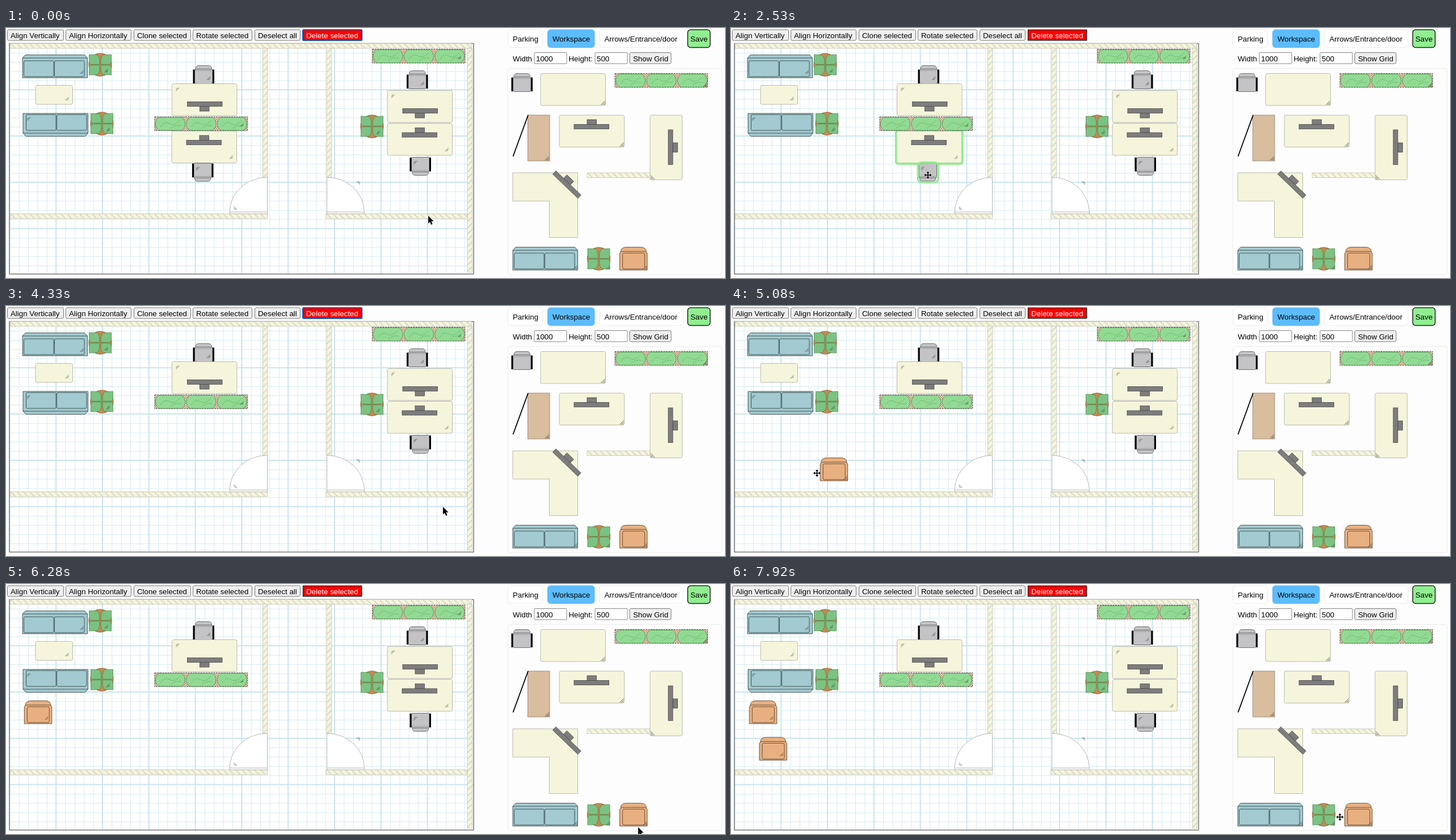
Write an HTML page that moves like this. It is 1267 px wide and 442 px high and loops after 8 s.

```html
<!DOCTYPE html>
<html lang="en">
<head>
<meta charset="utf-8">
<title>Floor plan editor</title>
<style>
html, body { margin: 0; width: 100%; height: 100%; overflow: hidden; background: #fdfdfd; }
svg { display: block; width: 1267px; height: 442px; }
text { font: 13.3px "Liberation Sans", Arial, sans-serif; fill: #000; }
.btn { fill: #efefef; stroke: #767676; }
.tab { fill: #fff; stroke: #ececec; }
.field { fill: #fff; stroke: #858585; }
.desk { fill: #f5f5dc; stroke: #b9b9ae; }
.screen { fill: #7d7d7d; stroke: #4a4a4a; stroke-width: .8; }
.sofa { fill: #a2cad0; stroke: #26383c; stroke-width: .8; }
.seat { fill: #e8b081; stroke: #4f3623; stroke-width: .8; }
.leaf { fill: #7cc282; stroke: #3f7f47; stroke-width: .7; }
.bush { fill: #92da94; stroke: #4b9452; stroke-width: .8; }
.vein { fill: none; stroke: #6cb972; stroke-width: .9; }
.chair { fill: #c3c3c6; stroke: #555; stroke-width: .8; }
.door { fill: #fff; stroke: #b5b5b5; }
.wall { stroke: #c4c4b6; stroke-width: .8; }
.pick { fill: none; stroke: #90ee90; stroke-width: 3.4; }
.grip { fill: none; stroke: #333; stroke-width: .8; }
.mark { fill: #000; opacity: .22; }
.cursor { fill: #000; stroke: #fff; stroke-linejoin: round; paint-order: stroke; }
</style>
</head>
<body>
<svg viewBox="0 0 1267 442">
  <defs>
    <pattern id="minor" x="6.4" y="27.4" width="16.36" height="16.36" patternUnits="userSpaceOnUse">
      <path d="M0 .4H16.4M.4 0V16.4" stroke="#cce6f0" stroke-width=".9"/>
    </pattern>
    <pattern id="major" x="5.4" y="26.4" width="81.8" height="81.8" patternUnits="userSpaceOnUse">
      <path d="M0 .8H82M.8 0V82" stroke="#c6e3ee" stroke-width="1.6"/>
    </pattern>
    <pattern id="hatch" width="11" height="8.5" patternUnits="userSpaceOnUse">
      <rect width="11" height="8.5" fill="#f5f5dc"/>
      <path d="M1 0L9.5 8.5" stroke="#cdcdc1" stroke-width="1.4"/>
    </pattern>
    <pattern id="soil" width="4" height="4" patternUnits="userSpaceOnUse">
      <rect width="4" height="4" fill="#e6d3bd"/>
      <path d="M0 0L2 2M4 2L2 4" stroke="#a3433c" stroke-width=".9"/>
    </pattern>

    <rect id="table" class="desk" width="114.5" height="56.5" rx="3"/>
    <rect id="coffee" class="desk" width="65.5" height="33.5" rx="3"/>
    <rect id="stand" class="screen" x="49" y="8" width="16.5" height="8.5"/>
    <rect id="bar" class="screen" x="26" y="16.5" width="61.5" height="8"/>
    <g id="desk"><use href="#table"/><use href="#stand"/><use href="#bar"/></g>
    <g id="sofa" class="sofa">
      <path d="M0 41V6L5 .5H109.5L114.5 6V41Z"/>
      <path d="M0 6H114.5" fill="none"/>
      <rect x="2.5" y="11" width="52.5" height="28" rx="2"/>
      <rect x="56.5" y="11" width="52.5" height="28" rx="2"/>
    </g>
    <g id="seat" class="seat">
      <path d="M2 12V10Q2 .5 12 .5H37.5Q47.500 .5 47.500 10V12Z"/>
      <path d="M.5 41V11L4 8H45.500L49 11V41Z"/>
      <rect x="5.5" y="11" width="39" height="28" rx="2.5"/>
    </g>
    <path id="petal" class="leaf" d="M-1.2 -.6V-9Q-2 -15 -5 -17.500L-19.500 -18V-5Q-19 -2 -17 -.8Z"/>
    <g id="plant">
      <circle cx="20.5" cy="20.5" r="20.2" fill="#c98850" stroke="#8a5a34" stroke-width=".8"/>
      <g transform="translate(20.5 20.5)">
        <use href="#petal"/><use href="#petal" transform="scale(-1 1)"/>
        <use href="#petal" transform="scale(1 -1)"/><use href="#petal" transform="scale(-1)"/>
      </g>
    </g>
    <g id="bush">
      <path class="bush" d="M8 1H47Q53 4 53.5 12.5Q53 21 47 24H8Q2 21 1.5 12.5Q2 4 8 1Z"/>
      <path class="vein" d="M10 18Q18 6 26 12T45 6M28 21Q36 13 47 16"/>
    </g>
    <g id="planter">
      <rect width="163.5" height="24.5" fill="url(#soil)" stroke="#555" stroke-dasharray="3 1.5"/>
      <use href="#bush"/><use href="#bush" x="54.4"/><use href="#bush" x="108.8"/>
    </g>
    <g id="chairBody" class="chair">
      <rect x="4.5" y=".5" width="28.5" height="14" rx="5"/>
      <rect x="3" y="6.5" width="31.5" height="26" rx="2.5"/>
      <path d="M4 9H33.5" stroke="#8a8a8a"/>
    </g>
    <path id="arms" d="M0 7.500H3V32H0ZM34.500 7.500H37.500V32H34.500Z"/>
    <g id="chair"><use href="#chairBody"/><use href="#arms"/></g>
    <path id="grip" class="grip" d="M-8 -1L-1 -8M-5 -1L-1 -5M-2.5 -1L-1 -2.5"/>
    <path id="mark" class="mark" d="M-14 -7L-7 -14V-9L-9 -7Z"/>

    <path id="arrow" class="cursor" d="M0 0V13.5L3 10.7L5.2 15.8L7.6 14.7L5.4 9.8H9.6Z"/>
    <path id="move" class="cursor" d="M0 -6.5L2.7 -3.5H.8V-.8H3.5V-2.7L6.5 0L3.5 2.7V.8H.8V3.5H2.7L0 6.5L-2.7 3.5H-.8V.8H-3.5V2.7L-6.5 0L-3.5 -2.7V-.8H-.8V-3.5H-2.7Z"/>
    <path id="resize" class="cursor" d="M-5 -5H0L-1.6 -3.3L3.3 1.6L5 0V5H0L1.6 3.3L-3.3 -1.6L-5 0Z"/>
  </defs>

  <rect x="6" y="27.5" width="818" height="407.5" fill="#fff"/>
  <rect x="6" y="27.5" width="818" height="407.5" fill="url(#minor)"/>
  <rect x="6" y="27.5" width="818" height="407.5" fill="url(#major)" stroke="#808080" stroke-width="1.6"/>
  <rect x="884.5" y="71.5" width="377.5" height="364.5" rx="4" fill="#fdfdfd" stroke="#ececec"/>
  <g id="ui"></g>
  <g id="walls"></g>
  <g class="door">
    <path d="M394 326A66 62.5 0 0 1 460.5 264V328.5H394Z"/><path d="M394 325.3H460"/>
    <path d="M631.5 326A66 62.5 0 0 0 565.5 264V328.5H631.5Z"/><path d="M566 325.3H631"/>
  </g>
  <use href="#mark" transform="translate(394.5 328.5) rotate(90)"/>
  <use href="#mark" transform="translate(631 264) rotate(-90)"/>
  <g id="plan"></g>
  <g id="palette">
    <path d="M893 256H1007.500V370.500H957.500V306H893Z" class="desk"/>
    <g transform="translate(988.5 277) rotate(44) translate(-57 -20.5)">
      <use href="#stand" x="-4"/><use href="#bar"/>
    </g>
    <rect x="919.5" y="154" width="38.5" height="81" fill="#d8bd9f" stroke="#a08c78"/>
    <path d="M920 154L893.5 227" stroke="#000" stroke-width="1.8"/>
    <use href="#grip" x="958" y="235"/>
  </g>
  <g id="first"></g>
  <g id="second"></g>
  <use id="cursor" href="#arrow"/>
</svg>
<script>
const $ = id => document.getElementById(id);
const add = (id, html) => $(id).insertAdjacentHTML('beforeend', html);
const SIZE = {
  table: [114.5, 56.5], coffee: [65.5, 33.5], desk: [114.5, 56.5], sofa: [114.5, 41],
  seat: [49.5, 41], plant: [41, 41], planter: [163.5, 24.5], chair: [37.5, 33]
};

// Items keep their corner handle when turned around.
function item(kind, x, y, turned, handle = 'mark', id = '') {
  const [w, h] = SIZE[kind];
  const at = turned ? `translate(${x + w} ${y + h}) rotate(180)` : `translate(${x} ${y})`;
  return `<g id="${id}" transform="${at}"><use href="#${kind}"/><use href="#${handle}" x="${w}" y="${h}"/></g>`;
}
const put = (...args) => add('plan', item(...args));
const stock = (kind, x, y, handle = 'grip') => add('palette', item(kind, x, y, false, handle));

function box(cls, x, y, w, h, r, label, tx, ty, style = '') {
  add('ui', `<rect class="${cls}" x="${x}" y="${y}" width="${w}" height="${h}" rx="${r}" style="${style}"/>
    <text x="${tx}" y="${ty}">${label}</text>`);
}
const button = (x, w, label) => box('btn', x + .5, 3, w - 1, 19, 2.5, label, x + 6, 17.5);
button(2, 100, 'Align Vertically');
button(105, 116, 'Align Horizontally');
button(225, 101, 'Clone selected');
button(329, 105, 'Rotate selected');
button(438, 81, 'Deselect all');
box('btn', 523.5, 3.3, 103.2, 18.5, 0, 'Delete selected', 529, 17.5, 'fill:#f00;stroke:#222;stroke-width:1.4');
$('ui').lastElementChild.style.fill = '#fff';
add('ui', '<rect id="focus" x="522.8" y="2.8" width="104.6" height="19.4" rx="2.5" fill="none" stroke="#1762d6" stroke-width="1.8"/>');

box('tab', 884.5, 3, 61, 31.5, 5, 'Parking', 893, 23.5);
box('tab', 954.5, 3, 82.5, 31.5, 5, 'Workspace', 963, 23.5, 'fill:#5cbcff;stroke:#66b5ee');
box('tab', 1045.5, 3, 147.5, 31.5, 5, 'Arrows/Entrance/door', 1054.5, 23.5);
box('tab', 1201.3, 3, 39.5, 31.5, 5, 'Save', 1206, 23.5, 'fill:#90ee90;stroke:#222;stroke-width:1.5');
box('field', 931, 43.5, 57, 19.5, 1, '1000', 934, 58.5);
box('field', 1038, 43.5, 57, 19.5, 1, '500', 1041, 58.5);
box('btn', 1099, 43.5, 73, 19.5, 2.5, 'Show Grid', 1105, 58.5);
add('ui', '<text x="893" y="58.5">Width</text><text x="991.5" y="58.5">Height:</text>');

function wall(layer, x, y, length, upright) {
  const at = upright ? `translate(${x + 8.5} ${y}) rotate(90)` : `translate(${x} ${y})`;
  add(layer, `<rect class="wall" transform="${at}" width="${length}" height="8.5" fill="url(#hatch)"/>`);
}
wall('walls', 7.5, 27.5, 813);
wall('walls', 813, 36, 396, true);
wall('walls', 452.5, 35.5, 229, true);
wall('walls', 565, 35.5, 229, true);
wall('walls', 7.5, 328.5, 453.5);
wall('walls', 564, 328.5, 248.5);
wall('palette', 1024, 256, 114);

put('sofa', 29, 47);
put('sofa', 30, 151, true);
put('coffee', 52, 101.5);
put('plant', 145.5, 44.5);
put('plant', 148.5, 148.5);
put('plant', 624.5, 153.5);
put('chair', 329.5, 66);
put('chair', 706, 75);
put('chair', 711.5, 228, true);
put('desk', 292.5, 98.5, true);
put('desk', 672, 110.5, true);
put('desk', 672, 168.5);
put('planter', 645.5, 37.5);
put('desk', 292, 182, false, 'mark', 'oldDesk');
add('plan', '<rect id="deskPick" class="pick" x="290.5" y="180.8" width="117.5" height="59.5" rx="4"/>');
put('planter', 262, 157);
add('plan', `<g id="oldChair"><g transform="translate(365.5 271.5) rotate(180)">
  <use href="#chairBody"/><use id="oldArms" href="#arms"/><use href="#mark" x="37.5" y="33"/></g>
  <rect id="chairPick" class="pick" x="329.3" y="237.8" width="35.8" height="34.8" rx="6"/></g>`);

stock('chair', 890.5, 80, '');
stock('table', 942, 80.5);
stock('planter', 1073, 80.5);
stock('desk', 975, 154);
add('palette', `<g transform="translate(1191.5 154) rotate(90)"><use href="#desk"/>
  <use href="#grip" x="114.5" y="56.5"/></g>`);
stock('sofa', 893, 387);
stock('plant', 1024, 387.5);
stock('seat', 1081, 387);
for (const id of ['first', 'second'])
  add(id, '<use href="#seat"/><use class="corner" x="49.5" y="41" href="#grip"/>');

// Bursts of activity: start, end, number of steps
const BURSTS = [[150, 750, 5], [1200, 2080, 7], [2530, 3430, 7], [3580, 3580, 1], [3880, 4780, 7],
  [4930, 5530, 5], [5830, 6730, 7], [6880, 7330, 4], [7620, 7920, 3]];
const POINTER = [
  [0, 744, 332, 'arrow'], [300, 570, 266, 'arrow'], [450, 450, 222, 'arrow'], [600, 360, 200, 'move'],
  [750, 343, 197, 'move'], [1200, 343, 197, 'move'], [1350, 343, 212, 'move'], [1500, 343, 234, 'move'],
  [1640, 343, 248, 'resize'], [1930, 347, 260, 'move'], [2530, 347, 260, 'move'],
  [2680, 362, 240, 'arrow'], [2980, 490, 82, 'arrow'], [3130, 545, 26, 'arrow'], [3280, 558, 12, 'arrow'],
  [3580, 558, 12, 'arrow'], [3880, 540, 50, 'arrow'], [4030, 476, 200, 'arrow'], [4180, 560, 300, 'arrow'],
  [4480, 980, 410, 'arrow'], [4630, 1100, 420, 'move'], [4780, 1099, 417, 'move'],
  [4930, 640, 350, 'move'], [5080, 151.5, 295.5, 'move'], [5230, 68, 248, 'move'], [5380, 50, 236, 'move'],
  [5530, 50, 236, 'move'], [5830, 200, 270, 'arrow'], [6130, 1060, 415, 'arrow'], [6280, 1114, 430, 'arrow'],
  [6430, 1100, 418, 'move'], [6580, 1098, 416, 'move'], [6730, 870, 395, 'move'], [6880, 240.5, 334, 'move'],
  [7030, 104, 312, 'move'], [7180, 70, 302, 'move'], [7330, 68, 301, 'move'],
  [7620, 260, 320, 'arrow'], [7770, 880, 400, 'arrow'], [7920, 1073, 412, 'move']
];
const DRAGS = {
  first: { drop: 5830, path: [[4930, 710, 336], [5080, 156.7, 268], [5230, 62, 222], [5380, 34, 207], [5530, 31.8, 206]] },
  second: { drop: 7620, path: [[6730, 924, 379], [6880, 296.7, 319.5], [7030, 112, 285], [7180, 54, 272], [7330, 49.5, 270.5]] }
};

// The screen only refreshes at the steps of each burst.
function snap(t) {
  let last = 0;
  for (const [start, end, n] of BURSTS) {
    if (t < start) break;
    const gap = n > 1 ? (end - start) / (n - 1) : 1;
    last = start + Math.min(n - 1, Math.floor((t - start) / gap + 1e-6)) * gap;
  }
  return last;
}

function at(path, t) {
  let i = path.length - 1;
  while (i > 0 && path[i][0] > t + .01) i--;
  const a = path[i], b = path[i + 1] || a;
  const k = a === b ? 0 : Math.max(0, (t - a[0]) / (b[0] - a[0]));
  return [a[1] + (b[1] - a[1]) * k, a[2] + (b[2] - a[2]) * k, a[3]];
}

const show = (id, on) => $(id).setAttribute('visibility', on ? 'visible' : 'hidden');
const place = (id, [x, y]) => $(id).setAttribute('transform', `translate(${x} ${y})`);

function draw(t) {
  const pose = at(POINTER, t);
  place('cursor', pose);
  $('cursor').setAttribute('href', '#' + pose[2]);
  show('focus', t < 1200 || t >= 3429 && t < 4930);
  const kept = t < 3580, chairOn = kept && t >= 2530;
  show('oldDesk', kept);
  show('deskPick', kept && t >= 1200);
  show('oldChair', kept);
  show('oldArms', kept && !chairOn);
  show('chairPick', chairOn);
  for (const id in DRAGS) {
    const { drop, path } = DRAGS[id];
    show(id, t >= path[0][0] - .01);
    place(id, at(path, t));
    $(id).querySelector('.corner').setAttribute('href', t >= drop ? '#mark' : '#grip');
  }
}

const began = performance.now();
function tick() {
  draw(snap((performance.now() - began) % 8000));
  requestAnimationFrame(tick);
}
tick();
</script>
</body>
</html>
```
